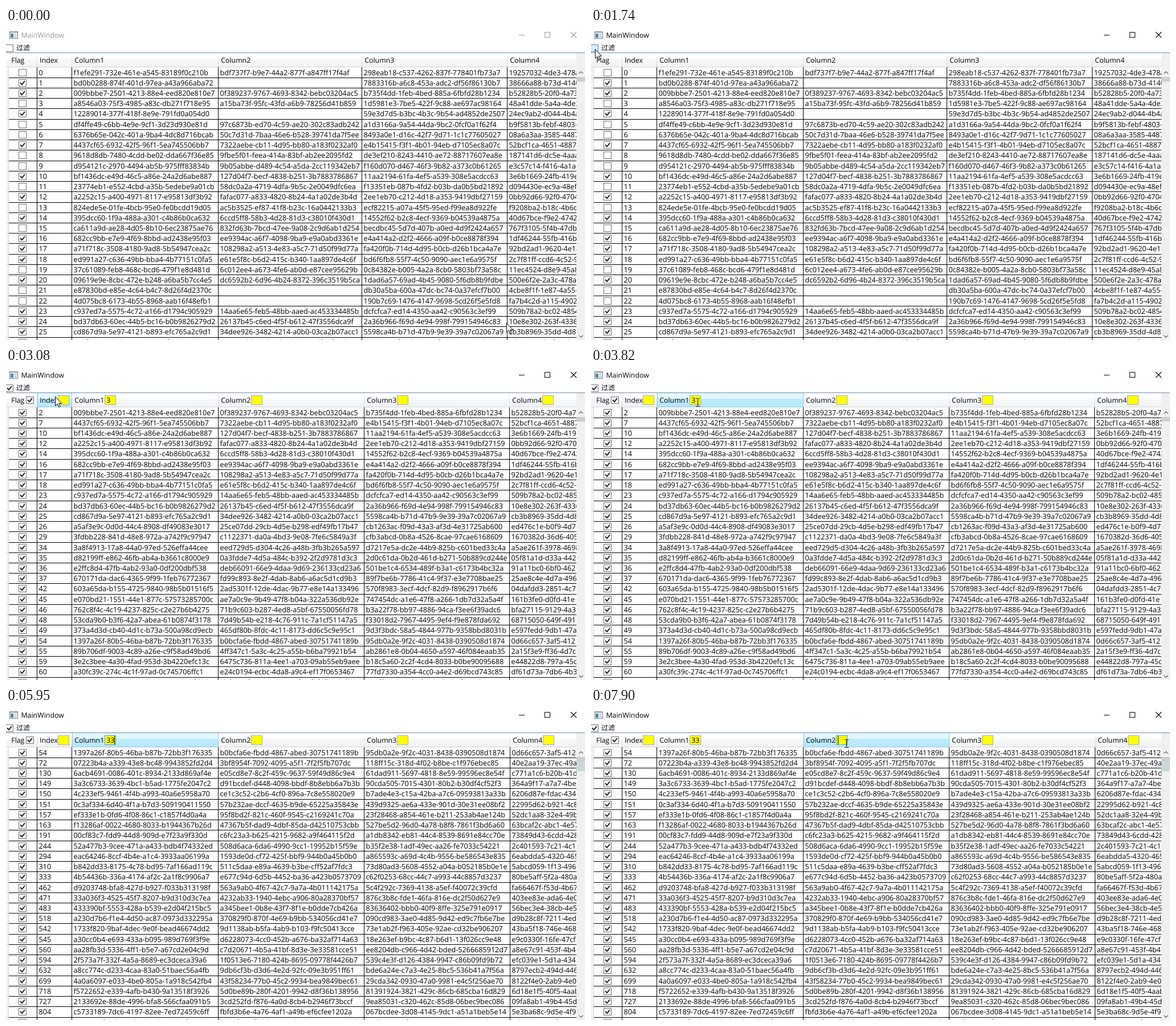
Animation of 1016x548 px, one loop 8000 ms. Source, as an HTML page with a canvas:

```html
<!DOCTYPE html>
<html lang="zh">
<head>
<meta charset="utf-8">
<title>MainWindow</title>
<style>
html, body { margin: 0; width: 100%; height: 100%; overflow: hidden; background: #fff; }
canvas { display: block; }
</style>
</head>
<body>
<canvas id="stage" width="1016" height="548"></canvas>
<script>
const ctx = document.getElementById('stage').getContext('2d');
const LOOP = 8000, W = 1016, H = 548, RIGHT = 1001;
const FACE = '"Open Sans", "Noto Sans", sans-serif';
const TITLES = ['Flag', 'Index', 'Column1', 'Column2', 'Column3', 'Column4'];

// Index, Column1 .. Column4; the last column runs out of the window
const unflagged = [0, 3, 5, 6, 8, 9, 11, 13, 15, 19, 21, 22];
const table = `0,f1efe291-732e-461e-a545-83189f0c210b,bdf737f7-b9e7-44a2-877f-a847ff17f4af,298eab18-c537-4262-837f-778401fb73a7,19257032-4de3-478a
1,bd0b0288-874f-401d-97ea-a43a966aba72,,7883316b-a6c8-453a-adc2-df56f86130b7,38666a88-b73d-4140
2,009bbbe7-2501-4213-88e4-eed820e810e7,0f389237-9767-4693-8342-bebc03204ac5,b735f4dd-1feb-4bed-885a-6fbfd28b1234,b52828b5-20f0-4a73
3,a8546a03-75f3-4985-a83c-db271f718e95,a15ba73f-95fc-43fd-a6b9-78256d41b859,1d5981e3-7be5-422f-9c88-ae697ac98164,48a41dde-5a4a-4de2
4,12289014-377f-418f-8e9e-791fd0a054d0,,59e3d7d5-b3bc-4b3c-9b54-ad4852de2507,24ec9ab2-d044-4b4a
5,df4ffe49-c6bb-4e9e-9cf1-3d23d930e81d,97c6873b-ed70-4c59-ae20-302c83adb242,a1d3166a-9a54-44da-9bc2-0fcf0a1f62f4,b9f5813b-febf-4803-
6,6376b65e-042c-401a-9ba4-4dc8d716bcab,50c7d31d-7baa-46e6-b528-39741da7f5ee,8493a0e1-d16c-42f7-9d71-1c1c77605027,08a6a3aa-3585-4487
7,4437cf65-6932-42f5-96f1-5ea745506bb7,7322aebe-cb11-4d95-bb80-a183f0232af0,e4b15415-f3f1-4b01-94eb-d7105ec8a07c,52bcf1ca-4651-4887-
8,9618d8db-7480-4cdd-be02-dda667f36e85,9fbe5f01-feea-414a-83bf-ab2ee2095fd2,de3ef210-8243-4410-ae72-88717607ea8e,187141d6-dc5e-4aaa
9,d954121c-2970-4494-ab5b-975fff83834b,9b05abbe-d489-4c54-a5da-2cc119342eb7,f160d070-d467-46f3-9b82-a373c0b61265,e3c57c14-f416-4a1a-
10,bf1436dc-e49d-46c5-a86e-24a2d6abe887,127d04f7-becf-4838-b251-3b7883786867,11aa2194-61fa-4ef5-a539-308e5acdcc63,3e6b1669-24fb-419e
11,23774eb1-e552-4cbd-a35b-5edebe9a01cb,58dc0a2a-4719-4dfa-9b5c-2e0049dfc6ea,f13351eb-087b-4fd2-b03b-da0b5bd21892,d094430e-ec9a-48ef
12,a2252c15-a400-4971-8117-e95813df3b92,fafac077-a833-4820-8b24-4a1a02de3b4d,2ee1eb70-c212-4d18-a353-9419dbf27159,0bb92d66-92f0-4704
13,824ede5e-01fe-4bcb-95e0-fe0bcdd19d05,ac5b3525-ef87-41f8-b23c-16a0442133b3,ecf82215-a07a-45f5-95ed-f99ea8d922fe,f9208ba2-b18c-4b6d
14,395dcc60-1f9a-488a-a301-c4b86b0ca632,6ccd5ff8-58b3-4d28-81d3-c38010f430d1,14552f62-b2c8-4ecf-9369-b04539a4875a,40d67bce-f9e2-4742
15,ca611a9d-ae28-4d05-8b10-6ec23875ae76,832fd63b-7bcd-47ee-9a08-2c9d6ab1d254,becdbc45-5d7d-407b-a0ed-4d9f2424a657,767f3105-5f4b-47db
16,682cc9bb-e7e9-4f69-8bbd-ad2438e95f03,ee9394ac-a6f7-4098-9ba9-e9a0abd3361e,e4a414a2-d2f2-4666-a09f-b0ce8878f394,1df46244-55fb-416b
17,a71f718c-3508-4180-9ad8-5b54947cea2c,108298a2-a513-4e83-a5c7-71d50f99d77a,fa420f0b-714d-4d95-b0cb-d26b1bca4a7e,92bd2ad1-9620-4e1a
18,ed991a27-c636-49bb-bba4-4b77151c0fa5,e61e5f8c-b6d2-415c-b340-1aa897de4c6f,bd6f6fb8-55f7-4c50-9090-aec1e6a9575f,2c7f81ff-ccd6-4c52-9
19,37c61089-feb8-468c-bcd6-479f1e8d481d,6c012ee4-a673-4fe6-ab0d-e87cee95629b,0c84382e-b005-4a2a-8cb0-5803bf73a58c,11ec4524-d8e9-45a8
20,09619e9e-8cbc-472e-b248-a6ba5b7cc4e5,dc6592b2-6d96-4b24-8372-396c3519b5ca,1dad6a57-69ad-4b45-9080-5f6db8b9fdbe,500e6f2e-2a3c-478a
21,e87830bd-e85e-4c64-b4c7-8d26f4d2370c,,db30a5ba-600a-47dc-bc74-0a37efcf7b00,4cbe8f1f-1e87-4a55-
22,4d075bc8-6173-4b55-8968-aab16f48efb1,,190b7c69-1476-4147-9698-5cd26f5e5fd8,fa7b4c2d-a115-4902
23,c937ed7a-5575-4c72-a166-d1794c905929,14aa6e65-feb5-48bb-aaed-ac453334485b,dcfcfca7-ed14-4350-aa42-c90563c3ef99,509b78a2-bc02-4854
24,bd37db63-60ec-44b5-bc16-b0b9826279d2,26137b45-c6ed-4f5f-b612-47f3556dca9f,2a36b966-f69d-4e94-998f-799154946c83,10e8e302-263f-4336
25,cd867d9a-5e97-4121-b893-efc765a2c9d1,34dee926-3482-4214-a0b0-03ca2b07acc1,5598ca4b-b71d-47b9-9e39-39a7c02067a9,cb3b8969-35dd-4d8
26,a5af3e9c-0d0d-44c4-8908-df49083e3017,25ce07dd-29cb-4d5e-b298-edf49fb17b47,cb1263ac-f09d-43a3-af3d-4e31725ab600,ed476c1e-b0f9-4d7
29,3fdbb228-841d-48e8-972a-a742f9c97947,c1122371-da0a-4bd3-9e08-7fe6c5849a3f,cfb3abcd-0b8a-4526-8cae-97cae6168609,1670382d-36d6-405
34,3a8f4913-17a8-44a0-97ed-526effa44cee,eed729d5-d304-4c26-a48b-3fb3b265a597,d7217e5a-dc2e-44b9-825b-c601bed33c4a,a5ae261f-3978-4698
35,d82199ff-e862-46fb-ab4a-b3661c8000e9,0a3fdde7-4d5a-484c-b392-2f2d9781d3c3,2d0c61da-0b2d-461d-b271-50b889cd244e,05f81a1d-d33a-442
36,e2ffc8d4-47fb-4ab2-93a0-0df200dbf538,deb66091-66e9-4daa-9d69-236133cd23a6,501be1c4-6534-489f-b3a1-c6173b4bc32a,91a11bc0-6bf0-462
37,670171da-dac6-4365-9f99-1feb76772367,fd99c893-8e2f-4dab-8ab6-a6ac5d1cd9b3,89f7be6b-7786-41c4-9f37-e3e7708bae25,25ae8c4e-4d7a-496
42,603a65da-b155-4725-9840-98b5b01516f5,2ad5301f-12de-4dac-9b77-e8e14a133496,570f8983-3ecf-4dcf-82d9-f8962917b6f6,04dafdd3-2851-4c7
45,e070bd21-1551-44e1-877c-57573285700c,ae7a0c9e-9b49-47f8-b04a-322a536db92e,747454dc-a1e6-47f8-a266-1db7d32a5a4f,161b3fe0-d0fd-41e
46,762c8f4c-4c19-4237-825c-c2e27b6b4275,71b9c603-b287-4ed8-a5bf-67550056fd78,b3a22f78-bb97-4886-94ca-f3ee6f39adc6,bfa27115-9129-4a3
48,53cda9b0-b3f6-42a7-abea-61b0874f3178,7d49b54b-e218-4c76-911c-7a1cf51147a5,f33018d2-7967-4495-9ef4-f9e878fda692,68715050-649f-491
49,373a4d3d-cb40-4d1c-b73a-500a98cd9ecb,465df80b-8fdc-4c11-8173-dd6c5c9e95c1,9d3f3bdc-58a5-4844-977b-9358bbd8031b,e597fedd-9db1-47a
54,1397a26f-80b5-46ba-b87b-72bb3f176335,b0bcfa6e-fbdd-4867-abed-30751741189b,95db0a2e-9f2c-4031-8438-0390508d1874,0d66c657-3af5-412
55,89b706df-9003-4c89-a26e-c9f58ad49bd6,4ff347c1-5a3c-4c25-a55b-b6ba79921b54,ab2861e8-0b04-4650-a597-46f084eaab35,2a15f3e9-ff36-4d7c
59,3e2c3bee-4a30-4fad-953d-3b4220efc13c,6475c736-811a-4ee1-a703-09ab55eb9aee,b18c5a60-2c2f-4cd4-8033-b0be90095688,e44822d8-797a-45c
60,a30fc39c-274c-4c1f-97ad-0c745706ffc1,e24c0194-ecbc-4da8-a9c4-ef17f0653467,77fd7330-a354-4cc0-a4e2-d69bcd743c85,df61d73a-7db6-4b3
72,07223b4a-a339-43e8-bc48-9943852fd2d4,3bf8954f-7092-4095-a5f1-7f2f5fb707dc,118ff15c-318d-4f02-b8be-c1f976ebec85,40e2aa19-37ec-49a
130,6acb4691-0086-401c-8934-2133d869af4e,e05cd8e7-8c2f-459c-9637-59f49d86c9e4,61dad911-5697-4818-8e59-99596ec8e54f,c771a1c6-b20b-41d
149,3a3c6733-3639-4bc1-b5ad-1775fe2047c2,d91bcdef-d448-4098-bbdf-8b8ebb6a7b3b,90cda505-7015-4301-80b2-b30df4cf52f3,364a9f17-a7a7-4be6
150,4c233ef5-9461-4f4b-a993-40a6e5958a70,ce1c3c52-c2b6-4cf0-896a-7c8e558020e9,b7ade4e3-c15a-42ba-a7c6-09593813a33b,6206d87e-fdac-434
151,0c3af334-6d40-4f1a-b7d3-509190411550,57b232ae-dccf-4635-b9de-65225a35843e,439d9325-ae6a-433e-901d-30e31ee08bf2,22995d62-b921-4c8
157,ef333e1b-0fd6-4f08-86c1-c1857f4d0a4a,95f8bd2f-821c-460f-9545-c2169241c70a,23f28468-a854-461e-b211-253ab4ae124b,52dc1aa8-32e4-49b
163,f13286af-0022-4680-8033-b1944367b26d,47367b5f-dad9-4dbf-85da-d42510753cbb,527be5d2-96d0-4a78-b8f8-7861f3bd6a60,63bcaf2c-abc1-4e57
191,00cf83c7-fdd9-44d8-909d-e7f23a9f330d,c6fc23a3-b625-4215-9682-a9f464115f2d,a1db8342-eb81-44c4-8539-8691e84cc70e,73849d43-6cdd-428
244,52a477b3-9cee-471a-a433-bdb4f74332ed,508d6aca-6da6-4990-9cc1-19952b15f59e,b35f2e38-1adf-49ec-aa26-fe7033c54221,2c401593-7c21-4c1
294,eac64246-8ccf-4b4e-a1c4-3933aa06199a,1593de0d-cf72-425f-bbf9-944b0a45b0b0,a865593c-a69d-4c4b-9556-be586543e835,6eabdda5-4320-465
310,b842dd33-8175-4c78-bd95-7af166ad119c,511c5daa-e89a-4639-b3be-cff52af7fdc3,73d80ad3-5608-4552-a04a-b052185b0e1e,5abcd059-1f13-496
333,4b54436b-336a-4174-af2c-2a1f8c9906a7,e677c94d-6d5b-4452-ba36-a423b0573709,c62f0253-68cc-44c7-a993-44c8857d3237,80be5aff-5f2a-480a
462,d9203748-bfa8-427d-b927-f033b313198f,563a9ab0-4f67-42c7-9a7a-4b011142175a,5c4f292c-7369-4138-a5ef-f40072c39cfd,fa66467f-f53d-4b67
471,33a036f3-4525-45f7-8207-b9d310d3c7ea,4232ab33-1940-4ebc-a906-80a28370bf57,876c3b8c-fde1-46fa-816e-dc2f50d627e9,403ee83e-ada6-4e0
483,433390bf-5553-428a-b539-e2d04f215bc5,a345bee1-0b8e-43f7-8f1e-b0dde7cb426a,83636402-bbb0-40f9-8ffe-325e791e0917,56bec3e4-38cb-4e5
518,a230d7b6-f1e4-4d50-ac87-0973d332295a,370829f0-870f-4e69-b9bb-534056cd41e7,090cd983-3ae0-4d85-9d42-ed9c7fb6e7be,d9b28c8f-7211-4ed
542,1733f820-9baf-4dec-9e0f-bead46674dd2,9d1138ab-b5fa-4ab9-b103-f9fc50413cce,73e1ab2f-f963-405e-92ae-cd32be906207,43ba5f18-746e-468
545,a30cc0b4-e693-433a-b095-989d769f3f9e,d6228073-4cc0-452b-a676-ba32af714a63,18e263ef-b9bc-4c87-b6d1-13f026cc9e48,e9c0330f-16fe-47cf
560,aa28fb3d-5336-4ff1-b5e7-a67cd2e04c9d,c7d20671-4b5a-41bf-8d3e-3e33581cce51,ee8204db-c966-4d42-bded-5266685912d7,a8e67c91-453f-4b4
594,2f573a7f-332f-4a5a-8689-ec3dceca39a6,1f0513e6-7180-424b-8695-09778f4426b7,539c4e3f-d126-4384-9947-c86b09fd9b72,efc039e1-5d1a-434
632,a8cc774c-d233-4caa-83a0-51baec56a4fb,9db6cf3b-d3d6-4e2d-92fc-09e3b951ff61,bde6a24e-c7a3-4e25-8bc5-536b41a7f56a,8797ecb2-494d-446
699,4a0a6097-e033-4be0-805a-1a918c542fb4,43f58234-77b0-45c2-9934-bea9849bec61,29cda342-0930-47a0-9981-e4c5f256ae70,8122f4e0-2ab9-4e0
718,f5722652-e339-4afb-b430-9a13518f3926,5d0be89b-280f-4201-9942-d8f36b138956,81391924-3821-429c-86cb-685cba16d829,6d18e1f5-40f5-4aab
727,2133692e-88de-4996-bfa8-566cfaa091b5,3cd252fd-f876-4a0d-8cb4-b2946f73bccf,9ea85031-c320-462c-85d8-06bec9bec086,09fa8ab1-49b4-45d
804,c5733189-7dc6-4197-82ee-7ed72459c6ff,fbfd3b6e-4a76-4af1-a49b-ef6cfee1202a,067bcdee-3d08-4145-9dc1-a51a1beb5e14,5e3ba68c-9d5e-4f9`
  .split('\n').map(line => {
    const cells = line.split(',');
    return { cells, flag: !unflagged.includes(+cells[0]) };
  });

const search = q => table.filter(r => r.flag && r.cells[2] && r.cells[1].includes(q));

// Visible rows and column edges for each search text
const views = {
  '': { list: table, seps: [4, 54, 115, 372, 624, 879] },
  3: { list: search('3'), seps: [4, 54, 115, 372, 628, 883] },
  33: { list: search('33'), seps: [4, 54, 115, 372, 628, 884] }
};

// Pointer moves in discrete steps: start, end, steps, from, to, sag
const moves = [
  [70, 470, 6, [878, 518], [-35, 26], 0],
  [990, 1130, 3, [-14, 40], [2, 37], 0],
  [1740, 1740, 1, [2, 37], [7, 37], 0],
  [2800, 3480, 11, [7, 37], [180, 65], 0],
  [3680, 3820, 3, [180, 65], [187, 60], 0],
  [6480, 7100, 10, [187, 60], [440, 64], 25],
  [7370, 7800, 6, [440, 64], [448, 62], 0]
];

function pointer(t) {
  let at = moves[0][3];
  for (const [t0, t1, n, a, b, sag] of moves) {
    if (t < t0) break;
    const step = n > 1 ? Math.floor((t - t0) / (t1 - t0) * (n - 1) + 1e-6) + 1 : 1;
    const u = Math.min(1, step / n);
    at = [a[0] + (b[0] - a[0]) * u, a[1] + (b[1] - a[1]) * u + sag * 4 * u * (1 - u)];
  }
  return at.map(Math.round);
}

function rect(x, y, w, h, fill) {
  ctx.fillStyle = fill;
  ctx.fillRect(x, y, w, h);
}

function frame(x, y, w, h, fill, edge) {
  rect(x, y, w, h, edge);
  rect(x + 1, y + 1, w - 2, h - 2, fill);
}

function text(s, x, y, size = 12.6, color = '#000', face = FACE) {
  ctx.font = `${size}px ${face}`;
  ctx.fillStyle = color;
  ctx.fillText(s, x, y);
}

function line(points, color, width) {
  ctx.beginPath();
  points.forEach(([x, y]) => ctx.lineTo(x, y));
  ctx.strokeStyle = color;
  ctx.lineWidth = width;
  ctx.stroke();
}

function checkbox(x, y, on, fill = '#fff', edge = '#707070') {
  frame(x, y, 14, 13, fill, edge);
  if (on) line([[x + 3, y + 6], [x + 6, y + 9.3], [x + 11, y + 3.2]], '#212121', 2);
}

function gradient(y, h, stops) {
  const g = ctx.createLinearGradient(0, y, 0, y + h);
  stops.forEach(([p, c]) => g.addColorStop(p, c));
  return g;
}

const plain = gradient(44, 24, [[0, '#fff'], [.4, '#fff'], [.4, '#f7f8fa'], [1, '#f1f2f4']]);
const hot = gradient(44, 24, [[0, '#e3f7ff'], [.4, '#e3f7ff'], [.4, '#bdedff'], [1, '#b7e7fb']]);
const side = gradient(44, 24, [[0, '#f2f2f2'], [.5, '#e0e1e3'], [1, '#d2d3d5']]);

function titleBar(active) {
  const ink = active ? '#000' : '#999';
  frame(6, 6, 15, 13, '#f4f6f8', '#777b80');
  rect(7, 7, 13, 2, '#c3c9d0');
  rect(8, 10, 5, 7, '#4c86a8');
  rect(14, 10, 5, 3, '#cfd4d8');
  rect(14, 14, 5, 3, '#cfd4d8');
  text('MainWindow', 26.4, 17, 12.4, ink);
  rect(900, 12, 10, 1, ink);
  frame(945, 7, 10, 10, '#fff', ink);
  line([[991, 7], [1001, 17]], ink, 1.1);
  line([[1001, 7], [991, 17]], ink, 1.1);
}

function toolbar(t, [x, y]) {
  const over = x >= 0 && x < 44 && y < 42;
  const pressed = t >= 1460 && t < 2400;
  const fill = pressed ? '#d9ecff' : over ? '#f3f9ff' : '#fff';
  const edge = pressed ? '#3c77dd' : over ? '#5593ff' : '#707070';
  checkbox(-1, 29, t >= 2400, fill, edge);
  text('过滤', 18, 39, 12, '#000', '"Noto Sans CJK SC", "Noto Sans CJK", sans-serif');
}

function rows({ list, seps }) {
  const edge = i => 69 + Math.floor(18.234 * i);
  for (let i = 0; i < 27; i++) {
    const top = edge(i), bottom = edge(i + 1), row = list[i % list.length];
    rect(0, bottom, 4, 1, '#d5d5d5');
    rect(5, bottom, RIGHT - 5, 1, '#000');
    checkbox(22, top + 3, row.flag);
    row.cells.forEach((s, c) => text(s, seps[c + 1] + 3.6, top + 14));
  }
  seps.slice(1).forEach(x => rect(x, 69, 1, H - 69, '#000'));
}

function header(t, query, seps, [px, py]) {
  const focus = t >= 7810 ? 3 : t >= 4080 ? 2 : 0;
  const caret = t < 4610 || (t >= 5140 && t < 6480) || t >= 7010;
  rect(0, 44, RIGHT, 24, plain);
  rect(0, 68, RIGHT, 1, '#d5d5d5');
  TITLES.forEach((name, i) => {
    const x = seps[i], end = i < 5 ? seps[i + 1] : RIGHT;
    if (py >= 44 && py < 69 && px > x && px <= end) {
      rect(x + 1, 44, end - x, 24, hot);
      rect(x + 1, 44, 1, 24, '#88cbeb');
      rect(x + 1, 68, end - x, 1, '#93c9e3');
      rect(end, 44, 1, 24, '#88cbeb');
    } else if (i < 5) rect(end, 44, 1, 24, side);
    text(name, x + 5.3, 61, 12.3);
    if (!query) return;
    if (i === 0) return checkbox(35, 50, true);
    const bx = i === 1 ? 91 : x + 58;
    frame(bx, 48, 20, 17, '#ff0', i === focus ? '#569de5' : '#abadb3');
    const value = i === 2 ? query : '';
    text(value, bx + 3.2, 61, 12.3);
    if (i === focus && caret) rect(bx + 3 + 7 * value.length, 49, 1, 15, '#000');
  });
}

function scrollBar(query) {
  rect(RIGHT, 44, W - RIGHT, H - 44, '#f0f0f0');
  line([[1005.5, 80], [1009, 76.5], [1012.5, 80]], '#606060', 1.2);
  line([[1005.5, 540], [1009, 543.5], [1012.5, 540]], '#606060', 1.2);
  rect(RIGHT, 86, 15, 8, '#cdcdcd');
  if (query === '33') rect(RIGHT, 94, 15, 17, '#cad8d8');
}

function cursor(t, query, [x, y]) {
  if (t >= 5290 && t < 6480) return;
  const inBox = query && y >= 48 && y <= 65 &&
    ((x >= 173 && x < 193) || (x >= 430 && x < 450));
  if (inBox) {
    rect(x, y - 6, 1, 13, '#000');
    [-7, 7].forEach(d => {
      rect(x - 3, y + d, 3, 1, '#000');
      rect(x + 1, y + d, 3, 1, '#000');
    });
    return;
  }
  const shape = [[0, 0], [0, 16], [3.7, 12.6], [6.3, 18.3], [8.6, 17.3], [6.1, 11.8], [11, 11.8]];
  ctx.beginPath();
  shape.forEach(([dx, dy]) => ctx.lineTo(x + dx + .5, y + dy + .5));
  ctx.closePath();
  ctx.fillStyle = '#fff';
  ctx.fill();
  ctx.strokeStyle = '#000';
  ctx.lineWidth = 1;
  ctx.stroke();
}

function draw(t) {
  const query = t < 2400 ? '' : t < 5950 ? '3' : '33';
  const view = views[query], at = pointer(t);
  rect(0, 0, W, H, '#fff');
  titleBar(t >= 1460);
  toolbar(t, at);
  rect(0, 69, 4, H - 69, '#f4f4f5');
  rect(4, 69, 1, H - 69, '#d5d5d5');
  ctx.save();
  ctx.beginPath();
  ctx.rect(0, 43, RIGHT, H - 43);
  ctx.clip();
  rows(view);
  header(t, query, view.seps, at);
  ctx.restore();
  scrollBar(query);
  rect(0, 43, W, 1, '#688caf');
  cursor(t, query, at);
}

ctx.textRendering = 'geometricPrecision';
const start = performance.now();
function tick() {
  draw((performance.now() - start) % LOOP);
  requestAnimationFrame(tick);
}
tick();
</script>
</body>
</html>
```
